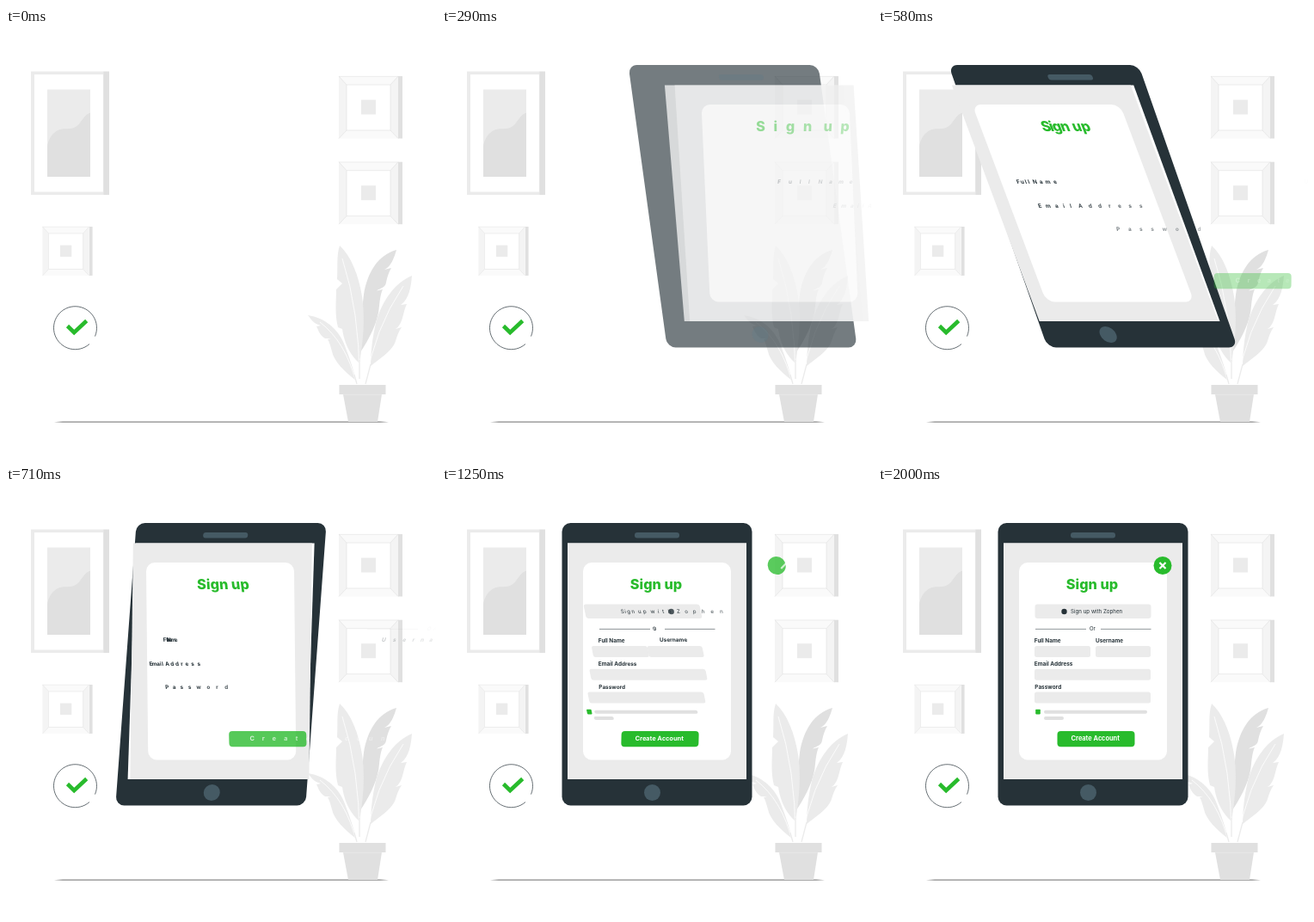
Animation, 500 px wide and 500 px high, one loop 2040 ms. Source, as an HTML page:

```html
<!DOCTYPE html>
<html lang="en">
<head>
<meta charset="utf-8">
<title>Sign up screen</title>
<style>
  html, body { margin: 0; width: 100%; height: 100%; overflow: hidden; background: #fff; }
  svg { display: block; width: 100%; height: 100%; }
  text { font-family: Inter, "Open Sans", sans-serif; }
</style>
</head>
<body>
<svg viewBox="0 0 500 500">
  <defs>
    <g id="frame">
      <path fill="#e0e0e0" d="M69 0h5v72.5h-5z"/>
      <path fill="#fafafa" d="M0 0h69v72.5H0z"/>
      <path fill="#f1f1f1" d="M0 0l9 10v53l-9 9.500zM69 0l-9 10v53l9 9.500z" opacity=".6"/>
      <path fill="#fff" stroke="#e6e6e6" stroke-width=".8" d="M9 10h51v53H9z"/>
      <path fill="none" stroke="#e0e0e0" stroke-width=".6" d="M0 0l9 10M69 0l-9 10M0 72.500l9-9.500M69 72.500l-9-9.500M0 .3h69"/>
      <path fill="#ebebeb" d="M26 27.500h17v17H26z"/>
    </g>
  </defs>

  <!-- wall -->
  <path fill="#ebebeb" d="M29 50.500h85v143.500H29z"/>
  <path fill="#e0e0e0" d="M113.500 50.500h6.500v143.500h-6.500z"/>
  <path fill="#fff" d="M33 54h80v136.500H33z"/>
  <path fill="#ebebeb" d="M48 71.500h50V173H48z"/>
  <path fill="#e0e0e0" d="M48 173v-36c2-10 8-18 17-19.500c8-1 14 1 20-6c5-6 7-11 13-13V173z"/>
  <use href="#frame" x="387" y="56"/>
  <use href="#frame" x="387" y="155.700"/>
  <use href="#frame" transform="translate(42.500 231) scale(.785)"/>

  <!-- badge -->
  <path fill="none" stroke="#263238" stroke-width=".7" d="M103.500 358.500A25 25 0 1 0 97 367.500"/>
  <path fill="none" stroke="#28bb2c" stroke-width="4.600" d="M71.500 346.500l7.700 7.500l14.500-13.500"/>

  <!-- floor and plant -->
  <path fill="#aaa" d="M56 458.300l10-1.100h369l10 1.100l-10 .7H66z"/>
  <path fill="#e0e0e0" d="M454 258C432 264 420 285 416 310C413 335 412 358 412 377C422 362 433 342 434 323C435 314 436 308 438 304L431 305.500C436 302 441 302 442 296C443 290 445 284 448 279L440 281C448 277 451 268 454 258z"/>
  <path fill="#ebebeb" d="M472 288C452 296 437 318 430 343C426 360 424 378 424 393C438 382 450 374 453 364C455 357 457 352 460 348L453 350C462 344 461 331 466 321L459 322C469 315 471 300 472 288z"/>
  <path fill="#ebebeb" d="M388 253C401 265 410 287 414 312C418 340 415 365 411 390C399 379 393 365 391 350L386 348C382 333 384 317 384 304L391 297L385 292C386 278 384 265 388 253z"/>
  <path fill="#ebebeb" d="M351 334C371 337 386 350 393 367C398 380 403 393 407 410C394 400 381 387 379 376C377 369 376 365 374 362L378 361L371 361C364 357 363 350 361 347L366 346C358 344 355 339 351 334z"/>
  <path fill="none" stroke="#fff" stroke-width=".8" d="M391 268Q411 330 411 408M365 342Q395 365 407 412M462 300Q428 350 418 414"/>
  <path fill="none" stroke="#ebebeb" stroke-width="1.300" d="M411 386V408M424 391L418 414M405 403L408 414"/>
  <path fill="#e0e0e0" d="M387.500 415h54v11h-54zM392 426h45l-5 32h-34z"/>
  <path stroke="#ebebeb" stroke-width=".8" d="M392 426.300h45"/>

  <g id="device"></g>
</svg>
<script>
const device = document.getElementById('device');
const ink = '#263238', green = '#28bb2c', pale = '#ebebeb', grey = '#e0e0e0', steel = '#455a64';
const loop = 2040, intro = 170, first = -30, step = 10.7;
const parts = [];

// Each part remembers the height it skews around.
function add(tag, attrs, cy, text) {
  const el = document.createElementNS('http://www.w3.org/2000/svg', tag);
  for (const key in attrs) el.setAttribute(key, attrs[key]);
  if (text) el.textContent = text;
  device.append(el);
  parts.push({ el, cy, start: first + step * parts.length });
}
const box = (x, y, width, height, rx, fill) =>
  add('rect', { x, y, width, height, rx, fill }, y + height / 2);
const dot = (cx, cy, r, fill) => add('circle', { cx, cy, r, fill }, cy);
const line = (d, cy, stroke, width) =>
  add('path', { d, stroke, 'stroke-width': width }, cy);

const pen = document.createElement('canvas').getContext('2d');
function write(text, x, y, size, weight, fill) {
  pen.font = `${weight} 100px Inter, "Open Sans", sans-serif`;
  [...text].forEach((char, i) => {
    if (char === ' ') return;
    const dx = pen.measureText(text.slice(0, i)).width * size / 100;
    add('text', { x: x + dx, y, fill, 'font-size': size, 'font-weight': weight }, y - size * .36, char);
  });
}

// The order of the parts sets their delays.
box(139.5, 43, 221, 328.5, 10, ink);
box(224, 54, 52, 6.5, 3, steel);
dot(244.5, 356.5, 9.5, steel);
box(146, 66.5, 208, 274.5, 0, '#fff');
box(146, 66.5, 208, 274.5, 0, pale);
box(164, 89, 172, 229.5, 10, '#fff');
write('Sign up', 218.8, 119.6, 16.3, 800, green);
write('Full Name', 181.8, 181.5, 6.4, 700, ink);
write('Email Address', 181.8, 209.2, 6.4, 700, ink);
write('Password', 182.3, 236.2, 6.4, 700, ink);
box(208.5, 285, 90, 18.3, 4, green);
write('Create Account', 224.5, 296.3, 7.4, 700, '#fff');
write('Username', 253, 181.5, 6.4, 700, ink);
line('M183 166.400h59', 166.4, ink, .5);
line('M259 166.400h58.500', 166.4, ink, .5);
write('Or', 246, 168.3, 6, 400, ink);
box(182, 186, 65, 13, 2.5, pale);
box(182, 212.8, 135, 13, 2.5, pale);
box(182, 239.6, 135, 13, 2.5, pale);
box(253, 186, 64, 13, 2.5, pale);
box(183.2, 259.8, 5.6, 5.6, .8, green);
box(193, 260.7, 120, 4, 2, grey);
box(193, 268, 23, 4, 2, grey);
box(182.5, 137.6, 135, 16.4, 3, pale);
write('Sign up with Zophen', 224, 147.9, 6.2, 400, ink);
dot(216.5, 146, 3.2, ink);
dot(331, 92.5, 10.5, green);
line('M327.500 96l7-7', 92.5, '#fff', 2.2);
line('M327.500 89l7 7', 92.5, '#fff', 2.2);

// cubic-bezier(.36, -.01, .5, 1.38)
function ease(x) {
  const curve = (u, a, b) => 3 * (1 - u) ** 2 * u * a + 3 * (1 - u) * u * u * b + u ** 3;
  let low = 0, high = 1;
  for (let i = 0; i < 24; i++) {
    const mid = (low + high) / 2;
    if (curve(mid, .36, .5) < x) low = mid; else high = mid;
  }
  return curve(low, -.01, 1.38);
}

const tan = deg => Math.tan(deg * Math.PI / 180);

// Slide in from the right while leaning, then lean back and settle.
function pose({ el, cy, start }, time) {
  const ms = time - start;
  let shift = 0, lean = 0, alpha = 1;
  if (ms <= 0) {
    alpha = 0;
  } else if (ms < 600) {
    const p = ease(ms / 600);
    shift = 250 * (1 - p);
    lean = tan(-20) * (1 - p) + tan(10) * p;
    alpha = Math.min(1, Math.max(0, p));
  } else if (ms < 800) {
    lean = tan(10 - 12 * ease((ms - 600) / 200));
  } else if (ms < 1000) {
    lean = tan(-2) * (1 - ease((ms - 800) / 200));
  }
  el.setAttribute('transform', `matrix(1 0 ${lean} 1 ${shift - lean * cy} 0)`);
  el.setAttribute('opacity', alpha);
}

const whole = { el: device, cy: 207, start: -25 };
function draw() {
  const time = performance.now() % loop;
  device.style.display = time < intro ? 'none' : '';
  pose(whole, time);
  for (const part of parts) pose(part, time);
  requestAnimationFrame(draw);
}
draw();
</script>
</body>
</html>
```
